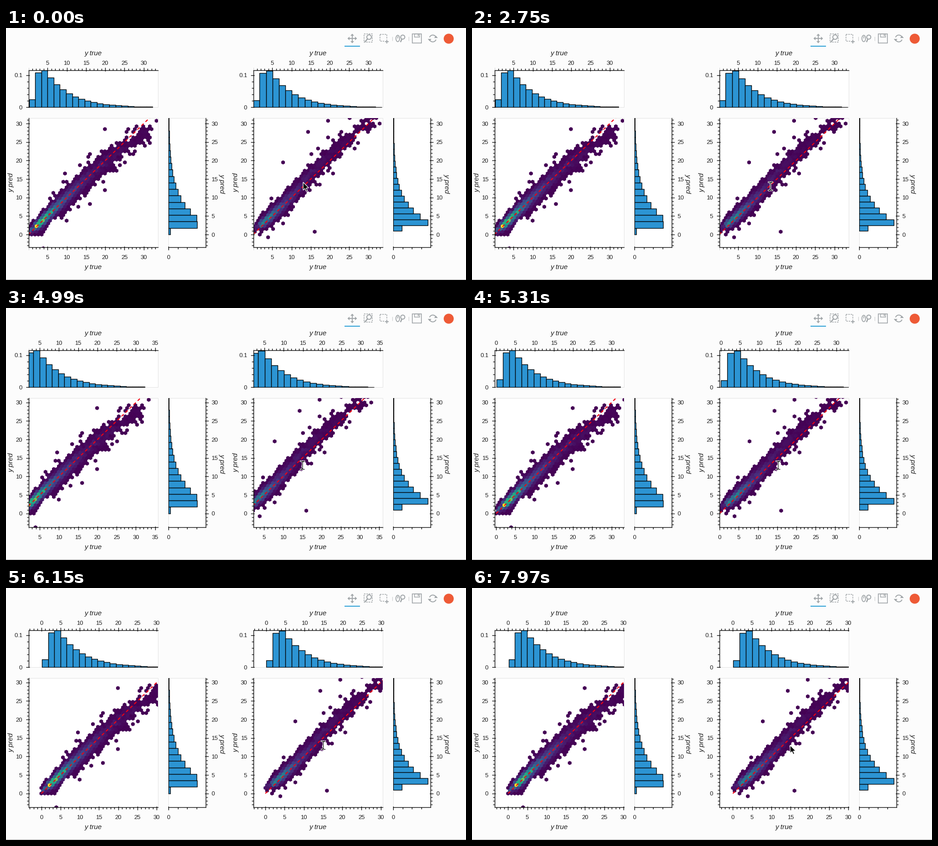
Write a matplotlib script that moves like this. It is 1011x554 px and loops after 8000 ms.

```python
import matplotlib.pyplot as plt
import numpy as np
from matplotlib.animation import FuncAnimation
from matplotlib.collections import LineCollection, PolyCollection
from matplotlib.patches import Circle, Polygon, Rectangle
from matplotlib.transforms import Affine2D

W, H, DPI = 1011, 554, 72
LOOP, STEP = 8000, 40
KX, KY = 8.45, 8.13             # pixels per data unit
X0, Y0 = 49.1, 454              # pixel position of the data origin
PANEL_DX = 494
BLUE, GRAY, PAPER, INK = "#2c94d3", "#a1a6a9", "#fcfcfc", "#1c1c1c"
LABEL, TITLE, STROKE = 13, 15.2, 1.35

plt.rcParams["font.family"] = "Liberation Sans"
plt.rcParams["toolbar"] = "None"
fig = plt.figure(figsize=((W + 1e-6) / DPI, (H + 1e-6) / DPI), dpi=DPI, facecolor=PAPER)
ax = fig.add_axes([0, 0, 1, 1])
ax.set(xlim=(0, W), ylim=(H, 0))
ax.axis("off")


def box(x0, y0, x1, y1, **style):
    style = {"fc": "none", "ec": "none", "lw": 1, **style}
    return ax.add_patch(Rectangle((x0, y0), x1 - x0, y1 - y0, **style))


def line(xs, ys, color="black", lw=STROKE, **style):
    return ax.plot(xs, ys, color=color, lw=lw, **style)[0]


def add_collection(coll, shift, clip):
    coll.set_transform(shift + ax.transData)
    ax.add_collection(coll, autolim=False)
    coll.set_clip_path(box(*clip))


def add_bars(spans, shift, clip):
    corners = [[(a, c), (b, c), (b, d), (a, d)] for a, b, c, d in spans]
    bars = PolyCollection(corners, facecolors=BLUE, edgecolors="black",
                          linewidths=STROKE, zorder=1)
    add_collection(bars, shift, clip)


def bar_profile(scale, decay, steepness, lead, n=20):
    """Bar lengths in pixels: a quick rise, then an exponential tail."""
    i = np.arange(n)
    return scale * np.exp(-decay * i) * (1 - np.exp(-steepness * (i + lead) ** 2))


def hex_cells(x, y, size=0.5):
    """Centres and counts of the pointy-top hexagons that hold the points."""
    w, h = np.sqrt(3) * size, 1.5 * size
    even = np.stack([np.round(x / w), 2 * np.round(y / (2 * h))], 1)
    odd = np.stack([np.floor(x / w) + 0.5, 2 * np.floor(y / (2 * h)) + 1], 1)

    def dist(cell):
        return (cell[:, 0] * w - x) ** 2 + (cell[:, 1] * h - y) ** 2

    cell = np.where((dist(even) < dist(odd))[:, None], even, odd)
    cell, count = np.unique(np.round(cell * [2, 1]).astype(int), axis=0, return_counts=True)
    return cell * [w / 2, h], count


def left_trend(x):
    return x + 0.6 * np.exp(-x / 2) - 0.01 * np.maximum(x - 12, 0) ** 2


def right_trend(x):
    return x + 1.5 * np.exp(-x / 3) + 1.6 * np.exp(-((x - 19) / 5) ** 2 / 2)


def scatter(spec):
    """Points around the trend, with a few far outliers."""
    rng = np.random.default_rng(spec["seed"])
    n, far = spec["n"], spec["far"]
    p = spec["top"] / spec["top"].sum()
    x = (rng.choice(len(p), n, p=p) + rng.random(n)) * spec["top_bin"] / KX + 0.1
    sigma = spec["spread"] * (1.25 - 0.9 * np.exp(-x / 6))
    sigma = sigma * np.where(rng.random(n) < 0.08, 1.8, 1)
    y = np.abs(spec["trend"](x) + sigma * rng.standard_normal(n))
    far_x = rng.uniform(4, 31, far)
    far_y = spec["trend"](far_x) + rng.normal(0.5, 3, far)
    lone_x, lone_y = np.transpose(spec["lone"])
    return np.concatenate([x, far_x, lone_x]), np.concatenate([y, far_y, lone_y])


LEFT = dict(
    dx=0, seed=4, n=5200, far=34, spread=1, trend=left_trend, peak_shade=1,
    top=bar_profile(138, 0.25, 0.55, 0.5), top_start=50.5, top_bin=13.58,
    side=bar_profile(110, 0.28, 0.98, 0.2), side_start=454, side_bin=14.25,
    lone=[(4.3, -3.6), (16.3, 8.4), (19.8, 28.7), (33, 30.8)])

RIGHT = dict(
    dx=PANEL_DX, seed=9, n=4000, far=20, spread=0.97, trend=right_trend, peak_shade=0.5,
    top=bar_profile(144, 0.27, 0.55, 0.45), top_start=543.3, top_bin=14.15,
    side=bar_profile(108, 0.3, 1.67, 0.34), side_start=446.5, side_bin=12.9,
    lone=[(15.9, 0.7), (4.2, -0.7), (19.4, 30.8), (14.6, 28), (7.7, 19.5)])


def tick_lines(positions, major, edge, out, vertical, shift, clip):
    """Ticks along an edge; out is +1 or -1, the side they stick out to."""
    segments = []
    for pos, big in zip(positions, major):
        ends = (edge - 2 * out, edge + 6 * out) if big else (edge, edge + 4 * out)
        segments.append([(e, pos) if vertical else (pos, e) for e in ends])
    ticks = LineCollection(segments, colors="black", linewidths=STROKE, zorder=2)
    add_collection(ticks, shift, clip)


def label(x, y, text, ha="center"):
    return ax.text(x, y + 4.6, text, fontsize=LABEL, color=INK, ha=ha, va="baseline")


class Panel:
    def __init__(self, spec):
        dx = self.dx = spec["dx"]
        self.x0, self.x1 = 49.5 + dx, 334 + dx
        self.top, self.main, self.bottom, self.side, self.still = (Affine2D() for _ in range(5))
        self.x_labels, self.y_labels = [], []
        l, r, s0, s1 = self.x0, self.x1, 357.2 + dx, 438.5 + dx

        for area in ((l, 93.5, r, 174.5), (l, 198, r, 482.5), (s0, 198, s1, 482.5)):
            box(*area, fc="white", ec="#e2e2e2", zorder=0)
        self.histograms(spec, s0, s1)
        self.hexes(spec)
        for xs, ys in (((l, r), (93.5, 93.5)), ((l, l), (93.5, 174.5)), ((l, l), (198, 482.5)),
                       ((l, r), (482.5, 482.5)), ((s0, s1), (482.5, 482.5)),
                       ((s1, s1), (198, 482.5))):
            line(xs, ys, zorder=2)
        self.axes_ticks(s0, s1)
        self.titles()

    def histograms(self, spec, s0, s1):
        start, step = spec["top_start"], spec["top_bin"]
        add_bars([(start + i * step, start + (i + 1) * step, 174.5 - h, 174.5)
                  for i, h in enumerate(spec["top"])],
                 self.top, (self.x0, 93, self.x1, 175.5))
        start, step = spec["side_start"], spec["side_bin"]
        add_bars([(s0, s0 + w, start - i * step, start - (i + 1) * step)
                  for i, w in enumerate(spec["side"])],
                 self.side, (s0 - 0.7, 198, s1, 483))

    def hexes(self, spec):
        centres, count = hex_cells(*scatter(spec))
        angle = np.radians(30 + 60 * np.arange(6))
        corner = 0.5 * np.stack([np.cos(angle), np.sin(angle)], 1)
        points = (centres[:, None] + corner) * [KX, -KY] + [X0 + self.dx, Y0]
        colors = plt.get_cmap("viridis")((count - 1) / count.max() * spec["peak_shade"])
        clip = (self.x0, 198, self.x1, 482.5)
        add_collection(PolyCollection(points, facecolors=colors, edgecolors=colors,
                                      linewidths=0.8, zorder=1), self.main, clip)
        diagonal = line([X0 + self.dx, X0 + self.dx + 40 * KX], [Y0, Y0 - 40 * KY], "#f5000f", 2.2,
                        linestyle=(0, (3, 2.6)), dash_capstyle="butt", zorder=1.5,
                        transform=self.main + ax.transData)
        diagonal.set_clip_path(box(*clip))

    def axes_ticks(self, s0, s1):
        l, r = self.x0, self.x1
        values = np.arange(-10, 46)
        major = values % 5 == 0
        xs, ys = X0 + self.dx + values * KX, Y0 - values * KY
        tick_lines(xs, major, 93.5, -1, False, self.top, (l, 86, r + 1, 97))
        tick_lines(xs, major, 482.5, 1, False, self.bottom, (l, 479, r + 1, 491))
        tick_lines(ys, major, l, -1, True, self.side, (l - 8, 198, l + 4, 483))
        tick_lines(ys, major, s1, 1, True, self.side, (s1 - 4, 198, s1 + 8, 483))
        for v, x, y in zip(values[major], xs[major], ys[major]):
            self.x_labels += [(label(x, 76.5, str(v)), x, self.top),
                              (label(x, 503, str(v)), x, self.bottom)]
            self.y_labels += [(label(36 + self.dx, y, str(v), "right"), y),
                              (label(451.5 + self.dx, y, str(v), "left"), y)]

        density = np.arange(6)
        tick_lines(174.5 - 14.1 * density, density % 5 == 0, l, -1, True,
                   self.still, (l - 8, 93, l + 4, 176))
        label(36 + self.dx, 103.5, "0.1", "right")
        label(36 + self.dx, 174, "0", "right")
        tick_lines(s0 + 20.5 * density[:4], density[:4] == 0, 482.5, 1, False,
                   self.still, (s0 - 1, 479, s1 + 1, 491))
        label(s0, 503, "0")

    def titles(self):
        style = dict(fontsize=TITLE, style="italic", color=INK, ha="center")
        for y in (60, 530):
            ax.text(192 + self.dx, y, "y true", va="baseline", **style)
        ax.text(11.5 + self.dx, 340, "y pred", rotation=90, va="center", **style)
        ax.text(475 + self.dx, 342, "y pred", rotation=270, va="center", **style)

    def move(self, x, y, main_x):
        for shift, dx, dy in ((self.top, x, 0), (self.main, main_x, y),
                              (self.bottom, main_x, 0), (self.side, 0, y)):
            shift.clear().translate(dx, dy)
        for text, base, shift in self.x_labels:
            pos = base + shift.get_matrix()[0, 2]
            text.set_x(pos)
            text.set_visible(self.x0 <= pos <= self.x1)
        for text, base in self.y_labels:
            text.set_y(base + y + 4.6)
            text.set_visible(198 <= base + y <= 483)


def toolbar():
    def stroke(xs, ys, lw=1.8, **style):
        line(xs, ys, GRAY, lw, solid_capstyle="butt", **style)

    def head(points):
        ax.add_patch(Polygon(points, fc=GRAY, ec="none"))

    def plus(x, y, r):
        stroke([x - r, x + r], [y, y], 2)
        stroke([x, x], [y - r, y + r], 2)

    def lens(x, y, r, hx, hy):
        stroke([x, hx], [y, hy], 2.6)
        ax.add_patch(Circle((x, y), r, fc=PAPER, ec=GRAY, lw=2, zorder=3))

    def dashed_box(x, y, size):
        box(x, y, x + size, y + size, ec=GRAY, lw=1.6, linestyle=(0, (2, 1.2)))

    # pan, the active tool
    plus(761, 23, 8)
    for ux, uy in ((1, 0), (-1, 0), (0, 1), (0, -1)):
        head([(761 + a * ux - b * uy, 23 + a * uy + b * ux)
              for a, b in ((10.5, 0), (6, 4), (6, -4))])
    line([744, 778], [40, 40], "#2a9fd6", 2, solid_capstyle="butt")
    # box zoom
    dashed_box(786.5, 13, 18)
    lens(798, 20, 5, 788.5, 31)
    # box select
    dashed_box(821.5, 14.5, 15)
    box(832, 25, 842, 34, fc=PAPER)
    plus(837, 30, 4)
    for x in (849, 885):
        stroke([x, x], [19, 28], 1, alpha=0.6)
    # wheel zoom
    t = np.linspace(0, 2 * np.pi, 40)
    stroke(861 + 4 * np.cos(t), 23 + 7 * np.sin(t))
    stroke([861, 861], [18, 23], 1.6)
    lens(872, 20, 4.5, 867, 31)
    # save
    box(893, 13, 913, 33, ec=GRAY, lw=1.7)
    box(897.5, 13, 908.5, 20, ec=GRAY, lw=1.5)
    stroke([905.5, 905.5], [14, 18], 2)
    # reset
    for side in (1, -1):
        arc = np.linspace(0.35, 2.7, 20)
        stroke(938 + side * 7.5 * np.cos(arc), 23 + side * 7.5 * np.sin(arc), 2)
        head([(938 + side * x, 23 - side * y) for x, y in ((3, 1), (11, 1), (7, 6))])
    ax.add_patch(Circle((973, 23.5), 11, fc="#ee5a36", ec="none"))


ARROW = np.array([(0, 0), (0, 17.5), (4, 13.8), (6.7, 20), (9.6, 18.8), (6.9, 12.8), (12.3, 12.5)])
# an upper cap, the stem and the mirrored lower cap in one stroke
BEAM_X = np.array([-4, -1.5, 0, 1.5, 4, 1.5, 0, 0, -1.5, -4, -1.5, 0, 1.5, 4])
BEAM_Y = np.array([-9, -9, -7.5, -9, -9, -9, -7.5, 7.5, 9, 9, 9, 7.5, 9, 9])

line([0, W], [553, 553], "#a8a8a8", 1)
left, right = Panel(LEFT), Panel(RIGHT)
toolbar()
arrow = ax.add_patch(Polygon(ARROW, fc="black", ec="white", lw=1.3, zorder=6))
beams = [line(BEAM_X, BEAM_Y, c, w, zorder=6) for c, w in (("white", 3.4), ("black", 1.2))]

HOVER, PRESS, RELEASE = 2450, 2880, 6600
PAN_KEYS = [(PRESS, 0), (3730, -18.5), (4960, -18.5), (5310, 4.6),
            (5730, 13.7), (6150, 28.9), (6420, 30.2)]


def pan_x(t):
    return np.interp(t, *np.transpose(PAN_KEYS))


def pan_y(t):
    return np.interp(t, [PRESS, PRESS + 240], [0, -2.3])


def cursor(t):
    if t < HOVER:
        return 653, 339
    # the drag only starts to count once the pointer has moved a little
    slack = np.interp(t, [PRESS - 130, PRESS], [0, 13])
    return 656 + slack + pan_x(t), 348 + pan_y(t)


def update(i):
    t = i * STEP + STEP / 2
    x, y = pan_x(t), pan_y(t)
    left.move(x, y, x)
    right.move(x, y, pan_x(t - 45))    # the busy right plot trails the drag
    cx, cy = cursor(t)
    dragging = HOVER <= t < RELEASE
    arrow.set_xy(ARROW + [cx, cy])
    arrow.set_visible(not dragging)
    for beam in beams:
        beam.set_data(BEAM_X + cx, BEAM_Y + cy)
        beam.set_visible(dragging)
    return []


anim = FuncAnimation(fig, update, frames=LOOP // STEP, interval=STEP,
                     init_func=lambda: update(0), repeat=True, repeat_delay=0, blit=False)
plt.show()
```
